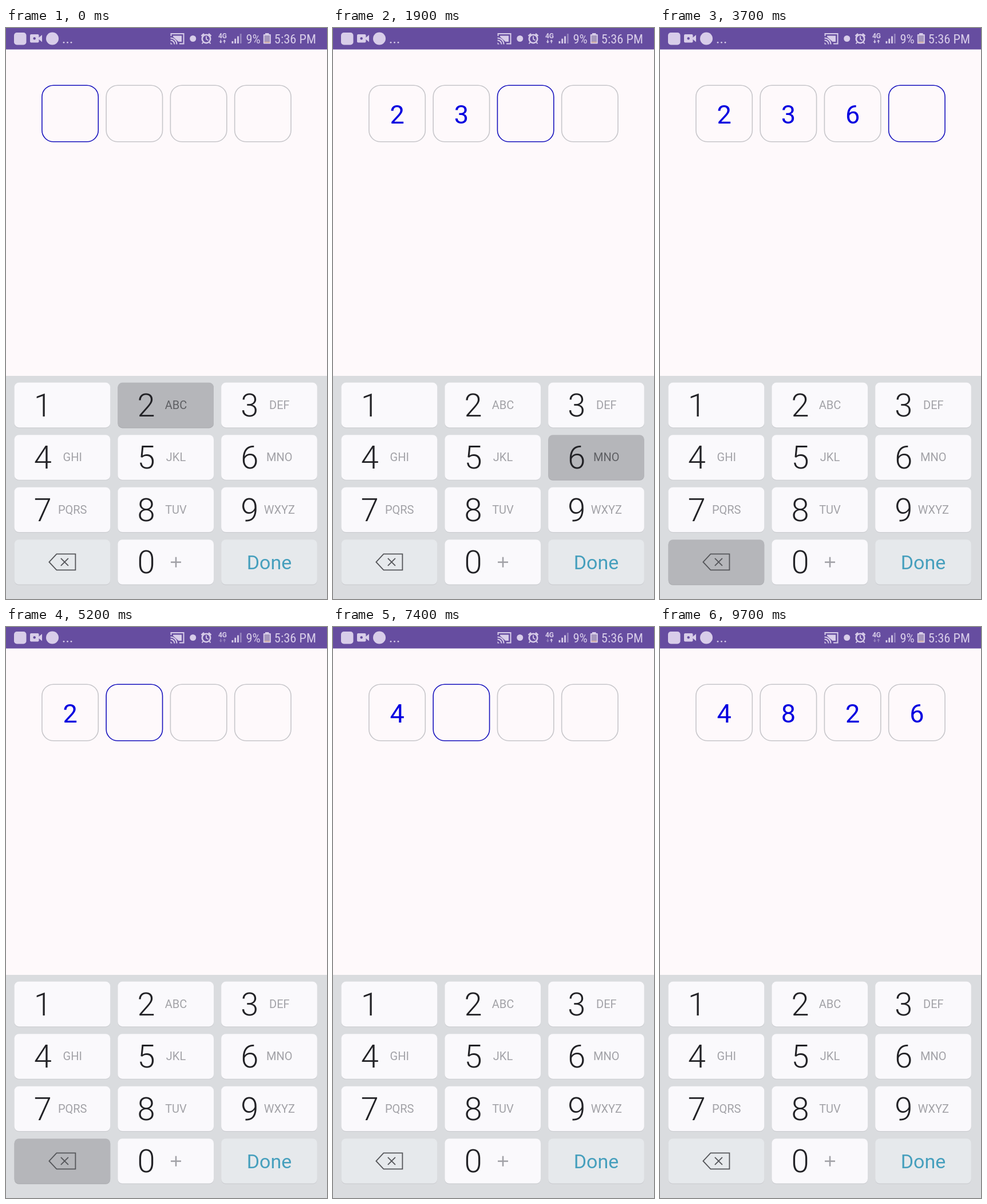
These frames come from a looping animation (561x998 px, 9900 ms). An HTML page with a canvas:

```html
<!DOCTYPE html>
<html lang="en">
<head>
<meta charset="utf-8">
<title>PIN entry</title>
<style>
html, body { margin: 0; width: 100%; height: 100%; overflow: hidden; background: #fef9fb; }
canvas { display: block; width: 561px; height: 998px; }
</style>
</head>
<body>
<canvas id="stage"></canvas>
<script>
const W = 561, H = 998, LOOP = 9900;
const canvas = document.getElementById('stage');
const ctx = canvas.getContext('2d');
const dpr = window.devicePixelRatio || 1;
canvas.width = W * dpr;
canvas.height = H * dpr;

const BACK = 'back', DONE = 'done';
const KEYS = ['1', '2', '3', '4', '5', '6', '7', '8', '9', BACK, '0', DONE];
const LETTERS = ['', 'ABC', 'DEF', 'GHI', 'JKL', 'MNO', 'PQRS', 'TUV', 'WXYZ'];
const ICON = '#d8cde9', BAR = '#664da0', DIM = '#9684be';

// key, time down, time up
const TAPS = [
  ['2', 0, 200], ['3', 1300, 1500], ['6', 1900, 2100], ['9', 2600, 2800],
  [BACK, 3350, 3900], [BACK, 4300, 4550], [BACK, 5050, 5400], [BACK, 5480, 5600],
  ['4', 6950, 7150], ['8', 8000, 8200], ['2', 8550, 8750], ['6', 9200, 9400]
];

// time, lit data arrows (1 = down, 2 = up)
const TRAFFIC = [
  [0, 3], [900, 2], [1400, 3], [2300, 0], [3000, 3], [4600, 0],
  [5500, 3], [7300, 2], [8000, 3], [9500, 0]
];

function entered(t) {
  let s = '';
  for (const [key, down, up] of TAPS) {
    if (key === BACK) { if (t >= down) s = s.slice(0, -1); }
    else if (t >= up) s += key;
  }
  return s;
}

function pressedKey(t) {
  const tap = TAPS.find(([, down, up]) => t >= down && t < up);
  return tap ? tap[0] : null;
}

function traffic(t) {
  return TRAFFIC.filter(([at]) => at <= t).pop()[1];
}

function fillRect(x, y, w, h, color) {
  ctx.fillStyle = color;
  ctx.fillRect(x, y, w, h);
}

function roundRect(x, y, w, h, r) {
  ctx.beginPath();
  ctx.roundRect(x, y, w, h, r);
}

function fillRound(x, y, w, h, r, color) {
  roundRect(x, y, w, h, r);
  ctx.fillStyle = color;
  ctx.fill();
}

function disc(x, y, r, color) {
  ctx.beginPath();
  ctx.arc(x, y, r, 0, 7);
  ctx.fillStyle = color;
  ctx.fill();
}

function path(points, closed) {
  ctx.beginPath();
  points.forEach(([x, y], i) => i ? ctx.lineTo(x, y) : ctx.moveTo(x, y));
  if (closed) ctx.closePath();
}

function line(points, color, width, closed) {
  path(points, closed);
  ctx.strokeStyle = color;
  ctx.lineWidth = width;
  ctx.stroke();
}

function poly(points, color) {
  path(points, true);
  ctx.fillStyle = color;
  ctx.fill();
}

function text(s, x, y, size, weight, color, align = 'center') {
  ctx.font = `${weight} ${size}px Roboto, sans-serif`;
  ctx.textAlign = align;
  ctx.fillStyle = color;
  ctx.fillText(s, x, y);
}

// Condensed label; takes a smaller size where no condensed face exists.
function barText(s, x, y, room) {
  const set = size => { ctx.font = `400 ${size}px "Roboto Condensed", Roboto, sans-serif`; };
  if ('fontStretch' in ctx) ctx.fontStretch = 'condensed';
  set(22.5);
  set(22.5 * Math.min(1, room / ctx.measureText(s).width));
  ctx.textAlign = 'left';
  ctx.fillStyle = ICON;
  ctx.fillText(s, x, y);
  if ('fontStretch' in ctx) ctx.fontStretch = 'normal';
}

function castIcon() {
  line([[288.5, 14], [288.5, 10], [310.5, 10], [310.5, 27.5], [303, 27.5]], ICON, 2);
  poly([[292, 13.5], [307, 13.5], [307, 24], [301.5, 24], [292, 15.5]], ICON);
  ctx.strokeStyle = ICON;
  ctx.lineWidth = 2;
  for (const r of [7, 11]) {
    ctx.beginPath();
    ctx.arc(287.5, 28.5, r, -Math.PI / 2, 0);
    ctx.stroke();
  }
  poly([[287.5, 25], [291, 28.5], [287.5, 28.5]], ICON);
}

function alarmIcon() {
  ctx.beginPath();
  ctx.arc(350, 19, 7.2, 0, 7);
  ctx.strokeStyle = ICON;
  ctx.lineWidth = 2.6;
  ctx.stroke();
  line([[350, 14.5], [350, 19.5], [353.5, 21.5]], ICON, 1.8);
  line([[341.5, 14], [346, 9.8]], ICON, 2.4);
  line([[358.5, 14], [354, 9.8]], ICON, 2.4);
  line([[344.5, 25], [342.5, 27.5]], ICON, 2);
  line([[355.5, 25], [357.5, 27.5]], ICON, 2);
}

function arrow(x, dir, color) {
  const y = 23.5;
  line([[x, y - 3 * dir], [x, y + 1 * dir]], color, 1.5);
  poly([[x - 2.6, y], [x + 2.6, y], [x, y + 3.2 * dir]], color);
}

function statusBar(t) {
  fillRect(0, 0, W, 37.5, BAR);

  fillRound(14, 8, 21.5, 21.5, 5, ICON);
  fillRound(42, 11, 15.5, 14.5, 2, ICON);
  poly([[57, 17], [63, 12], [63, 24.5], [57, 19.5]], ICON);
  disc(49.7, 18.2, 2.2, BAR);
  disc(81, 18.5, 11, ICON);
  for (const x of [101, 107.5, 114]) disc(x, 25.3, 1.4, ICON);

  castIcon();
  disc(326.7, 18.5, 5.5, ICON);
  alarmIcon();

  text('4G', 378.5, 17.5, 12, 700, ICON);
  const lit = traffic(t);
  arrow(375.3, 1, lit & 1 ? ICON : DIM);
  arrow(381.7, -1, lit & 2 ? ICON : DIM);

  for (let i = 0; i < 4; i++) {
    const h = 4 + i * 4.3;
    fillRect(394.5 + i * 4.8, 27 - h, 2.8, h, i < 3 ? ICON : DIM);
  }

  barText('9%', 419.5, 27, 25.5);
  fillRect(453, 9, 6.5, 3, ICON);
  fillRound(449.8, 11, 13, 16.5, 1, ICON);
  fillRect(451.6, 13, 9.4, 12.7, '#a597bd');
  fillRect(451.6, 24, 9.4, 1.7, '#d9b09d');
  barText('5:36 PM', 468.8, 27, 75.5);
}

function pinBoxes(t) {
  const value = entered(t);
  for (let i = 0; i < 4; i++) {
    const x = 62.9 + i * 112.25;
    roundRect(x, 100.2, 98.4, 98.6, 20);
    ctx.strokeStyle = i === value.length ? '#1712bd' : '#c7c6ca';
    ctx.lineWidth = 1.6;
    ctx.stroke();
    if (value[i]) text(value[i], x + 49.3, 167.3, 45, 400, '#0500e0');
  }
}

function backspaceIcon(x, y) {
  const ink = '#55565a';
  line([[x - 27, y], [x - 14, y - 14], [x + 19, y - 14], [x + 19, y + 14], [x - 14, y + 14]], ink, 1.8, true);
  line([[x - 6.5, y - 6.5], [x + 6.5, y + 6.5]], ink, 1.8);
  line([[x - 6.5, y + 6.5], [x + 6.5, y - 6.5]], ink, 1.8);
}

function keypad(t) {
  fillRect(0, 608, W, H - 608, '#dadcdf');
  const held = pressedKey(t);
  KEYS.forEach((key, i) => {
    const x = 14.6 + (i % 3) * 180.8;
    const y = 619.8 + Math.floor(i / 3) * 91.45;
    const down = key === held;
    const special = key === BACK || key === DONE;
    const face = down ? '#b5b6ba' : special ? '#e6e9ec' : '#faf9fc';
    fillRound(x, y + 1.2, 167.6, 78.4, 8, down ? '#abacb0' : '#cccdd1');
    fillRound(x, y, 167.6, 78.4, 8, face);

    if (key === BACK) return backspaceIcon(x + 87.8, y + 39.3);
    if (key === DONE) return text('Done', x + 83.8, y + 126.2 - 94.35 + 94.35 - 74.4, 34, 400, '#469fbd');

    text(key, x + 49.6, y + 59, 56, 300, '#222226');
    const ink = down ? '#5e5f63' : '#a2a2a7';
    if (key === '0') {
      const cx = x + 101.6, cy = y + 39.5;
      line([[cx - 9, cy], [cx + 9, cy]], ink, 2.6);
      line([[cx, cy - 9], [cx, cy + 9]], ink, 2.6);
    } else {
      text(LETTERS[i], x + 101.6, y + 46.2, 20, 400, ink);
    }
  });
}

function draw(t) {
  ctx.setTransform(dpr, 0, 0, dpr, 0, 0);
  fillRect(0, 0, W, H, '#fef9fb');
  statusBar(t);
  pinBoxes(t);
  keypad(t);
}

const start = performance.now();
function tick() {
  draw((performance.now() - start) % LOOP);
  requestAnimationFrame(tick);
}
tick();
</script>
</body>
</html>
```
